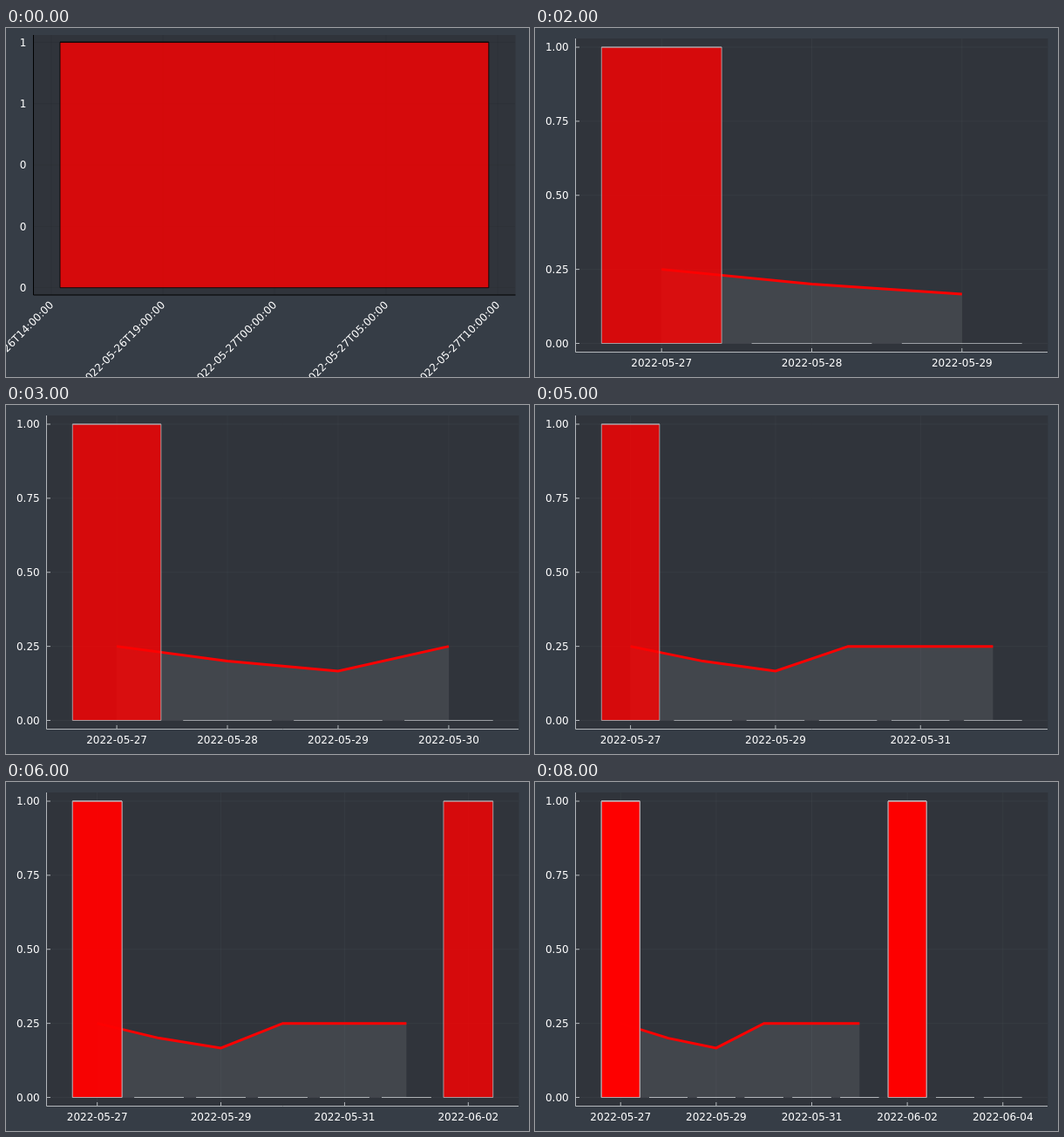
An HTML page with a canvas that plays this animation: 600x400 px, repeating every 9000 ms.

```html
<!DOCTYPE html>
<html lang="en">
<head>
<meta charset="utf-8">
<title>Daily bar chart</title>
<style>
html, body { margin: 0; width: 100%; height: 100%; overflow: hidden; background: #363d46; }
canvas { display: block; }
</style>
</head>
<body>
<canvas id="stage" width="600" height="400"></canvas>
<script>
const ctx = document.getElementById('stage').getContext('2d');
const FG = '#b4b8bc';
const trend = [1 / 4, 1 / 5, 1 / 6, 1 / 4, 1 / 4, 1 / 4];
const barValue = day => day % 6 === 0 ? 1 : 0;

function path(points, color, width, alpha = 1) {
  ctx.globalAlpha = alpha;
  ctx.strokeStyle = color;
  ctx.lineWidth = width;
  ctx.beginPath();
  points.forEach(([x, y]) => ctx.lineTo(x, y));
  ctx.stroke();
  ctx.globalAlpha = 1;
}

function rect(x, y, w, h, color, alpha = 1) {
  ctx.globalAlpha = alpha;
  ctx.fillStyle = color;
  ctx.fillRect(x, y, w, h);
  ctx.globalAlpha = 1;
}

function bar(x, y, w, h, stroke) {
  rect(x, y, w, h, '#f00', 0.8);
  const outline = h ? [[x, y], [x + w, y], [x + w, y + h], [x, y + h], [x, y], [x + w, y]] : [[x, y], [x + w, y]];
  path(outline, stroke, 1, 0.8);
}

function label(text, x, y, align) {
  ctx.fillStyle = '#fff';
  ctx.textAlign = align;
  ctx.fillText(text, x, y);
}

function background(x, y, w, h) {
  rect(0, 0, 600, 400, '#363d46');
  rect(x, y, w, h, '#30343b');
}

function drawHours() {
  background(32, 8, 552.5, 298);
  ['0', '0', '0', '1', '1'].forEach((text, i) => {
    const y = 297.7 - i * 70.35;
    path([[32, y], [584, y]], '#000', 1, 0.06);
    label(text, 23.3, y + 4.4, 'right');
  });
  ['26T14', '26T19', '27T00', '27T05', '27T10'].forEach((hour, i) => {
    const x = 52 + i * 128;
    path([[x, 8], [x, 306]], '#000', 1, 0.06);
    ctx.save();
    ctx.translate(x, 315);
    ctx.rotate(-Math.PI / 4);
    label(`2022-05-${hour}:00:00`, 0, 4.4, 'right');
    ctx.restore();
  });
  bar(62, 16.2, 491.8, 281.5, '#000');
  path([[31.5, 8], [31.5, 306], [584.5, 306]], '#000', 1);
}

function drawDays(count) {
  const unit = 482.4 / (count - 0.2);
  const dayX = day => 76.3 + (day + 0.4) * unit;
  const valueY = v => 361.5 - v * 339.5;
  background(46.5, 12, 541.8, 359.5);

  for (let v = 0; v <= 1; v += 0.25) {
    const y = valueY(v);
    path([[46.5, y], [588, y]], FG, 1, 0.05);
    path([[46.5, y], [51, y]], FG, 1);
    label(v.toFixed(2), 38.7, y + 4.4, 'right');
  }
  for (let day = 0; day < count; day += count > 5 ? 2 : 1) {
    const x = dayX(day);
    path([[x, 12], [x, 371.5]], FG, 1, 0.05);
    path([[x, 367], [x, 371.5]], FG, 1);
    const date = new Date(Date.UTC(2022, 4, 27 + day));
    label(date.toISOString().slice(0, 10), x, 387.6, 'center');
  }

  const line = trend.slice(0, count).map((v, day) => [dayX(day), valueY(v)]);
  ctx.fillStyle = 'rgba(255,255,255,0.085)';
  ctx.beginPath();
  ctx.moveTo(dayX(0), valueY(0));
  line.forEach(([x, y]) => ctx.lineTo(x, y));
  ctx.lineTo(line[line.length - 1][0], valueY(0));
  ctx.fill();
  path(line, '#f00', 3);

  // From the seventh day on, translucent bars stack up once per day.
  for (let day = 0; day < count; day++) {
    const layers = Math.max(1, count - Math.max(day, 5));
    const y = valueY(barValue(day));
    for (let k = 0; k < layers; k++) {
      bar(dayX(day - 0.4), y, 0.8 * unit, valueY(0) - y, FG);
    }
  }
  path([[46.5, 12], [46.5, 371.5], [588, 371.5]], FG, 1);
}

function frame() {
  const step = Math.floor(performance.now() % 9000 / 1000);
  ctx.font = '12px "DejaVu Sans", sans-serif';
  if (step === 0) drawHours();
  else drawDays(step + 1);
  requestAnimationFrame(frame);
}
frame();
</script>
</body>
</html>
```
